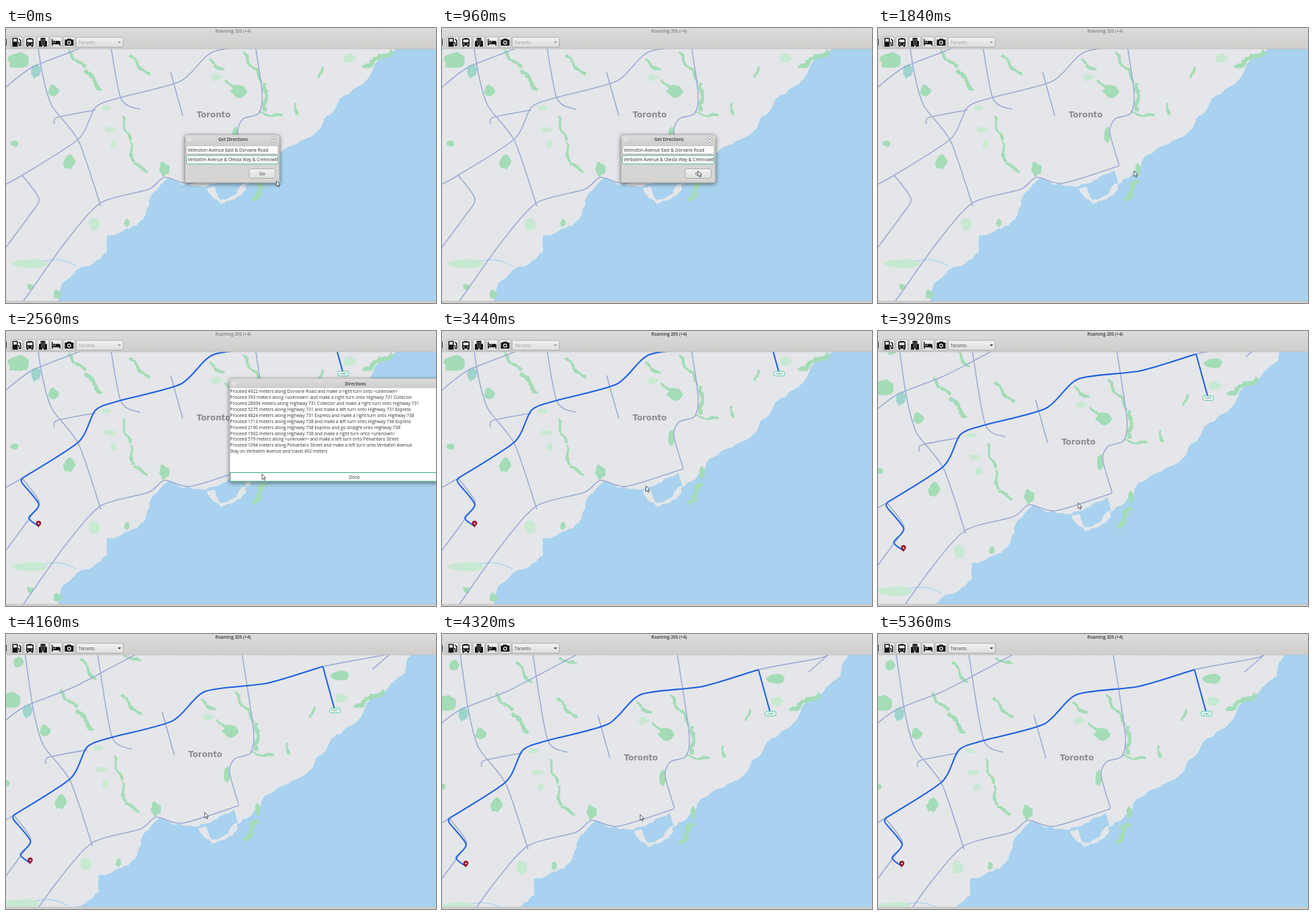
An HTML page that plays this animation: 640 by 409 pixels, repeating every 5.44 s.

```html
<!DOCTYPE html>
<html lang="en">
<head>
<meta charset="utf-8">
<title>Map directions</title>
<style>
html, body { margin: 0; width: 100%; height: 100%; overflow: hidden; background: #e4e6e9; }
svg { display: block; width: 100vw; height: 100vh; }
text { font-family: "Open Sans", "Noto Sans", sans-serif; font-size: 6.55px; fill: #2e3436; white-space: pre; }
.bold { font-weight: 600; font-size: 6.4px; text-anchor: middle; }
.mid { text-anchor: middle; }
.city { font: bold 11.8px "DejaVu Sans", sans-serif; fill: #8c8b93; }
#roads path { fill: none; stroke: #9dacd4; stroke-width: 1.6; }
#routeLine path { fill: none; stroke: #2263e2; stroke-width: 2.1; stroke-linejoin: round; }
.edge { stroke: #a5a3a1; stroke-width: .8; }
</style>
</head>
<body>
<svg viewBox="0 0 640 409" preserveAspectRatio="none">
  <defs>
    <linearGradient id="bar" x2="0" y2="1"><stop stop-color="#dddcda"/><stop offset="1" stop-color="#cfcdcb"/></linearGradient>
    <linearGradient id="button" x2="0" y2="1"><stop stop-color="#f3f2f1"/><stop offset="1" stop-color="#dfdddb"/></linearGradient>
    <filter id="shadow" x="-20%" y="-20%" width="140%" height="140%"><feDropShadow dx="0" dy="1.5" stdDeviation="3" flood-opacity=".55"/></filter>
    <clipPath id="view"><rect y="31" width="640" height="375.5"/></clipPath>
    <clipPath id="entry"><rect x="269" y="188" width="135.5" height="15"/></clipPath>
  </defs>

  <g clip-path="url(#view)">
    <rect width="640" height="409" fill="#e4e6e9"/>
    <g id="map">
      <g id="land"></g>
      <g id="roads"></g>
      <text class="city" x="283.7" y="133">Toronto</text>
      <g id="route">
        <g id="routeLine"></g>
        <rect x="494" y="60" width="16" height="6.8" rx="2.5" fill="#fff" stroke="#45c39a"/>
        <text class="mid" x="502" y="64.9" style="font-size:3.8px;font-weight:600;fill:#2f9c78">START</text>
        <path d="M48.5 292.500C47.500 289.500 44.800 288.500 44.800 286A3.700 3.700 0 0 1 52.200 286C52.200 288.500 49.500 289.500 48.500 292.500Z" fill="#a0061a"/>
        <circle cx="48.5" cy="286.2" r="1.3" fill="#f3dfe2"/>
      </g>
    </g>
  </g>

  <rect width="640" height="31" fill="url(#bar)"/>
  <rect y="406" width="640" height="3" fill="#d2d1d0"/>
  <path d="M0 31H640M0 406.300H640" stroke="#b5b4b3" stroke-width=".6"/>
  <text id="title" class="bold" x="338" y="7.3">Roaming 205 (+4)</text>
  <path d="M0 16V26" stroke="#151515" stroke-width="1.6"/>
  <g id="tools"></g>
  <rect class="edge" x="104.5" y="14" width="70" height="14.5" rx="1.5" fill="url(#button)"/>
  <g id="combo">
    <text x="108" y="23.9" style="fill:inherit">Toronto</text>
    <path d="M166.300 20H171.300L168.800 22.800Z"/>
  </g>

  <g id="dialog">
    <rect class="edge" x="266.5" y="159" width="140.5" height="71" rx="2.5" fill="#d6d5d3" filter="url(#shadow)"/>
    <rect x="267" y="159.5" width="139.5" height="13.5" rx="2" fill="url(#bar)"/>
    <circle cx="273.5" cy="165.7" r="2.7" fill="#e6e5e3"/>
    <circle class="edge" cx="398.5" cy="165.7" r="3.8" fill="#f0efee"/>
    <path d="M397.200 164.400L399.800 167M399.800 164.400L397.200 167" stroke="#444" stroke-width=".8"/>
    <text class="bold" x="338" y="168.3">Get Directions</text>
    <rect class="edge" x="268.5" y="175" width="136.5" height="12.5" rx="1.5" fill="#fbfbfa"/>
    <rect x="268.5" y="189.7" width="136.5" height="12.5" rx="1.5" fill="#fbfbfa" stroke="#55b394"/>
    <text x="270.5" y="183.5">Velmoton Avenue East &amp; Dorvane Road</text>
    <text x="270.5" y="198.3" clip-path="url(#entry)">Verbatim Avenue &amp; Olesta Way &amp; Crennowth</text>
    <rect class="edge" x="362" y="209.5" width="38.5" height="14" rx="2" fill="url(#button)"/>
    <text class="mid" x="381.3" y="218.8">Go</text>
  </g>

  <g id="directions">
    <rect class="edge" x="333" y="71" width="374" height="153" rx="2.5" fill="#fff" filter="url(#shadow)"/>
    <rect x="333.4" y="71.4" width="373" height="13.6" rx="2" fill="url(#bar)"/>
    <circle cx="339.5" cy="78" r="2.7" fill="#e6e5e3"/>
    <text class="bold" x="520" y="80.5">Directions</text>
    <g id="steps"></g>
    <rect x="333.8" y="210.5" width="372" height="13" fill="#fdfdfd" stroke="#4fae93" stroke-width="1.2"/>
    <text class="mid" x="518.5" y="219.5">Done</text>
  </g>

  <path id="cursor" d="M0 0V8.300L1.900 6.600L3.200 9.600L4.500 9L3.200 6.100H5.700Z" fill="#fff" stroke="#30343c" stroke-width=".8" stroke-linejoin="round"/>
</svg>

<script>
const LOOP = 5440, STEP = 80;
const WATER = '#a8d2ef', LAND = '#e4e6e9', GREEN = '#a3dcb6', PALE = '#c8e9d1';

const $ = id => document.getElementById(id);
function draw(parent, tag, attrs, text = '') {
  const el = document.createElementNS('http://www.w3.org/2000/svg', tag);
  for (const key in attrs) el.setAttribute(key, attrs[key]);
  el.textContent = text;
  $(parent).append(el);
}

let seed = 7;
const random = () => (seed = seed * 16807 % 2147483647) / 2147483647;
const between = (a, b) => a + (b - a) * random();
const mix = (a, b, u) => a.map((v, i) => v + (b[i] - v) * u);
const parse = list => list.split(' ').map(pair => pair.split(',').map(Number));
const line = points => 'M' + points.map(p => p.map(v => v.toFixed(1))).join('L');
const fill = (points, color) => draw('land', 'path', { d: line(points) + 'Z', fill: color });

// Midpoint displacement gives shores a natural edge.
function fractal(a, b) {
  const dx = b[0] - a[0], dy = b[1] - a[1];
  if (Math.hypot(dx, dy) < 5) return [a];
  const push = between(-.13, .13), [x, y] = mix(a, b, .5);
  const middle = [x - dy * push, y + dx * push];
  return [...fractal(a, middle), ...fractal(middle, b)];
}
const shore = list => parse(list).flatMap((p, i, all) => i + 1 < all.length ? fractal(p, all[i + 1]) : [p]);

function smooth(points) {
  const last = points.length - 1;
  let d = 'M' + points[0];
  for (let i = 0; i < last; i++) {
    const a = points[i], b = points[i + 1];
    const before = points[Math.max(0, i - 1)], after = points[Math.min(last, i + 2)];
    const c1 = a.map((v, n) => v + (b[n] - before[n]) / 8);
    const c2 = b.map((v, n) => v - (after[n] - a[n]) / 8);
    d += `C${c1} ${c2} ${b}`;
  }
  return d;
}

function park(x, y, rx, ry, color = GREEN) {
  const points = [];
  for (let angle = 0; angle < 6.2; angle += .45) {
    const r = between(.75, 1.15);
    points.push([x + Math.cos(angle) * rx * r, y + Math.sin(angle) * ry * r]);
  }
  fill(points, color);
}

// A ragged green strip that wanders around a straight course.
function valley(x1, y1, x2, y2, width = 4.5) {
  const length = Math.hypot(x2 - x1, y2 - y1), nx = (y1 - y2) / length, ny = (x2 - x1) / length;
  const left = [], right = [], phase = random() * 6;
  for (let s = 0; s <= length; s += 3) {
    const [x, y] = mix([x1, y1], [x2, y2], s / length);
    const drift = 2 * Math.sin(s / 5 + phase);
    const a = drift + width * between(.2, .7), b = drift - width * between(.2, .7);
    left.push([x + nx * a, y + ny * a]);
    right.unshift([x + nx * b, y + ny * b]);
  }
  fill([...left, ...right], GREEN);
}

const eastShore = '618,-26 580,32 552,50 526,86 497,105 490,120 441,167 410,185 397,191 392,204 358,232';
const westShore = '352,211 318,229 304,232 280,235 240,224 221,243 209,272 204,285 183,298 150,309 150,334 104,361 84,379 76,412';
fill([...shore(eastShore), ...shore(westShore), [700, 412], [700, -26]], WATER);
fill(shore('299,238 310,236 320,256 344,245 357,230 357,240 340,255 320,262 299,238'), LAND);

park(19, 47, 19, 13);
park(31, -9, 7, 8);
park(71, 93, 8, 8);
park(346, 94, 12, 9);
park(341, 159, 5, 12);
park(235, 210, 8, 11);
park(94, 200, 9, 11);
park(12, 172, 6, 5);
park(180, 290, 4, 6);
park(36, 385, 5, 5);
park(76, 396, 6, 8);
park(387, 211, 4, 9);
park(510, 11, 16, 8);
park(313, 74, 9, 5, PALE);
park(150, 119, 8, 4, PALE);
park(155, 151, 8, 4, PALE);
park(160, 172, 5, 6, PALE);
park(131, 292, 8, 11, PALE);
park(512, 45, 10, 7, PALE);
park(36, 350, 32, 7, PALE);
park(44, 64, 8, 11, '#9dd4cc');

valley(92, 34, 118, 60);
valley(118, 62, 142, 93, 6);
valley(124, -14, 146, 20);
valley(188, -20, 214, -8);
valley(184, 40, 213, 72);
valley(172, 131, 185, 170, 4);
valley(185, 170, 190, 202, 5);
valley(190, 202, 213, 214, 4);
valley(302, 48, 326, 64);
valley(327, 76, 340, 90);
valley(352, 36, 384, 82, 5);
valley(386, 82, 386, 126, 6);
valley(376, 127, 414, 131, 4);
valley(432, 111, 432, 131, 4);
valley(470, 57, 466, 75, 4);
valley(530, 58, 578, 34, 8);
valley(368, 257, 387, 224, 9);

const highway = parse('24,219 108,165 133,118 168,104 260,79 309,35 401,23 484,-2');
const road = (points, parent = 'roads') => draw(parent, 'path', { d: smooth(points) });
road([[-5, 235], ...highway, [575, -19], [590, -26]]);
[
  '-5,92 38,59 108,31 153,8 213,-24',
  '40,-26 53,62 68,115 108,168 141,265',
  '72,143 76,133 133,122',
  '148,-26 170,102 200,121',
  '245,66 263,130',
  '363,-26 381,95 376,127 353,135 345,155 359,204',
  '359,205 275,231 236,222 212,240 141,260 88,319 22,412',
  '24,219 49,254 34,280 -12,342',
  '558,2 588,-24'
].forEach(list => road(parse(list)));
draw('land', 'path', { d: 'M56 347Q80 340 105 354', fill: 'none', stroke: WATER, 'stroke-width': 1.3 });

road(parse('48,290 34,278 49,258 24,226 24,219'), 'routeLine');
road(highway, 'routeLine');
road([highway.at(-1), [501, 60]], 'routeLine');

const disc = (x, y, r) => `M${x - r} ${y}a${r} ${r} 0 1 0 ${2 * r} 0a${r} ${r} 0 1 0 ${-2 * r} 0Z`;
const pane = (x, y, w, h) => `M${x} ${y}h${w}v${h}h${-w}Z`;
const windows = [-4, -1, 2].map(y => pane(-2.2, y, 1.4, 1.4) + pane(.8, y, 1.4, 1.4)).join('');
const icons = {
  fuel: pane(-6.5, -6.5, 8, 13) + pane(-5, -5, 5, 4) + 'M2 0H4V4H5V-2L3-5L4-5.500L6.500-3V5.500H3V1.500H2Z',
  bus: 'M-5.500 5V-5Q0-8 5.500-5V5H4.500V6.800H2.500V5H-2.500V6.800H-4.500V5Z' + pane(-4, -4, 8, 4) + pane(-4, 2, 2, 1.5) + pane(2, 2, 2, 1.5),
  hotel: 'M-6 6.500V-2H-3.500V-6.500H3.500V-2H6V6.500Z' + windows + pane(-1, 4.5, 2, 2),
  bed: 'M-6.500-5H-5V1H-1V-2H4.500Q6.500-2 6.500 0V5H5V3H-5V5H-6.500Z' + disc(-3, -1, 1.5),
  camera: 'M-6.500-4H-3.500L-2.500-5.500H2.500L3.500-4H6.500V5H-6.500Z' + disc(0, .5, 3) + disc(0, .5, 1.6)
};
Object.values(icons).forEach((d, i) => {
  const transform = `translate(${16 + 19.5 * i} 21.2)`;
  draw('tools', 'rect', { class: 'edge', transform, x: -8.7, y: -8.2, width: 17.4, height: 16.4, rx: 2, fill: 'url(#button)' });
  draw('tools', 'path', { d, transform, fill: '#111', 'fill-rule': 'evenodd' });
});

const turn = (metres, road, side, next) =>
  `Proceed ${metres} meters along ${road} and ${side === 'straight' ? 'go straight' : `make a ${side} turn`} onto ${next}`;
const A = 'Highway 731', B = 'Highway 738', NONE = '<unknown>';
[
  turn(4922, 'Dorvane Road', 'right', NONE),
  turn(393, NONE, 'right', A + ' Collector'),
  turn(28094, A + ' Collector', 'right', A),
  turn(5275, A, 'left', A + ' Express'),
  turn(4824, A + ' Express', 'right', B),
  turn(1713, B, 'left', B + ' Express'),
  turn(2190, B + ' Express', 'straight', B),
  turn(1902, B, 'right', NONE),
  turn(579, NONE, 'left', 'Pelvantaro Street'),
  turn(1094, 'Pelvantaro Street', 'left', 'Verbatim Avenue'),
  'Stay on Verbatim Avenue and travel 492 meters'
].forEach((text, i) => draw('steps', 'text', { x: 333.5, y: 92.4 + i * 8.88 }, text));

const ramp = (t, from, to) => Math.max(0, Math.min(1, (t - from) / (to - from)));
const move = (id, [x, y]) => $(id).setAttribute('transform', `translate(${x} ${y})`);
const fade = (id, value) => $(id).setAttribute('opacity', value);

const CORNER = [402.5, 227], BUTTON = [381, 212.5], GRAB = [303.5, 230.5], DROP = [295, 268.5];

function render(time) {
  const t = Math.floor(time % LOOP / STEP) * STEP;
  // The drag slows down towards its end.
  const drag = .66 * ramp(t, 3440, 3920) + .34 * ramp(t, 3920, 4240);
  const toButton = mix(CORNER, BUTTON, ramp(t, 0, 560));
  const toMap = mix(toButton, GRAB, ramp(t, 3200, 3440));
  move('cursor', mix(toMap, DROP, drag));
  move('map', [-13 * Math.pow(drag, .5), 55 * drag]);
  fade('cursor', t < 4640 ? 1 : 0);
  fade('dialog', 1 - ramp(t, 1120, 1280));
  fade('directions', ramp(t, 2080, 2240) - ramp(t, 3200, 3360));
  fade('route', t < 2080 ? 0 : 1);
  $('title').style.fill = t < 3440 ? '#7d7f80' : '#2e3436';
  $('combo').style.fill = t < 3520 ? '#979a9b' : '#3a3f41';
}

const start = performance.now();
function tick() {
  render(performance.now() - start);
  requestAnimationFrame(tick);
}
tick();
</script>
</body>
</html>
```
